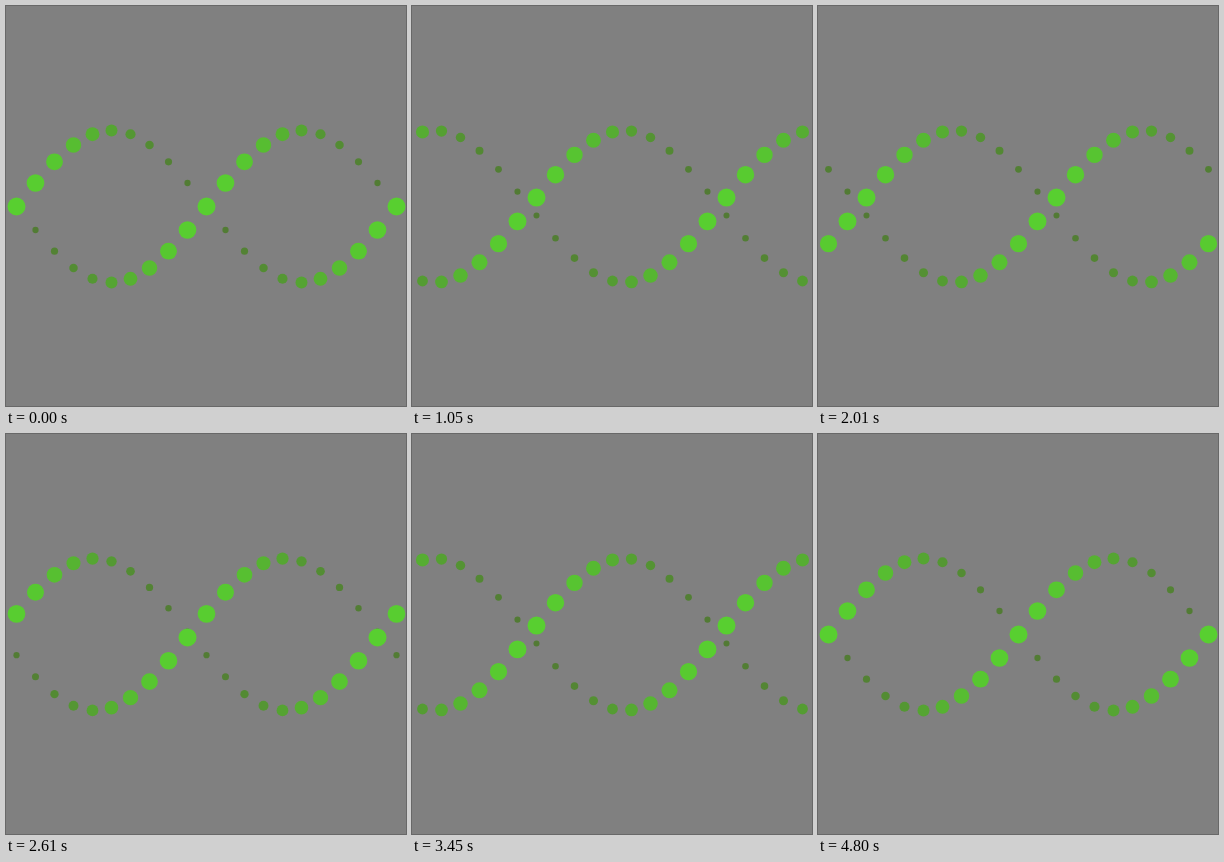
Recreate the animation shown at these times as an HTML page. Size 400 px wide and 400 px high, loop 4830 ms.

```html
<!DOCTYPE html>
<html lang="en">
<head>
<meta charset="utf-8">
<title>Double helix</title>
<style>
html, body { margin: 0; width: 100%; height: 100%; overflow: hidden; background: #808080; }
svg { display: block; width: 400px; height: 400px; }
</style>
</head>
<body>
<svg id="stage" viewBox="0 0 400 400"></svg>
<script>
const COLUMNS = 21, SPACING = 19, LEFT = 10.5, MIDDLE = 200.5, HEIGHT = 76;
const STEP = 30, LOOP = 4830, TURN = 4800;
const FAR = [82, 122, 52], NEAR = [88, 207, 48];
const stage = document.getElementById('stage');

function addDot() {
  const dot = document.createElementNS('http://www.w3.org/2000/svg', 'circle');
  stage.appendChild(dot);
  return dot;
}

const pairs = Array.from({ length: COLUMNS }, () => [addDot(), addDot()]);

function place(dot, x, angle) {
  const depth = Math.cos(angle);
  const mix = (1 + depth) / 2;
  const rgb = FAR.map((c, k) => Math.round(c + (NEAR[k] - c) * mix));
  dot.setAttribute('cx', x);
  dot.setAttribute('cy', MIDDLE - HEIGHT * Math.sin(angle));
  dot.setAttribute('r', 6 + 3 * depth);
  dot.setAttribute('fill', `rgb(${rgb})`);
}

function draw(ms) {
  const t = Math.floor((ms % LOOP) / STEP) * STEP;
  const spin = 2 * Math.PI * t / TURN;
  pairs.forEach(([back, front], i) => {
    const x = LEFT + SPACING * i;
    const angle = spin + i * Math.PI / 10;
    // the nearer strand is always drawn on top
    const near = Math.cos(angle) >= 0 ? angle : angle + Math.PI;
    place(back, x, near + Math.PI);
    place(front, x, near);
  });
}

const start = performance.now();
function tick() {
  draw(performance.now() - start);
  requestAnimationFrame(tick);
}
tick();
</script>
</body>
</html>
```
